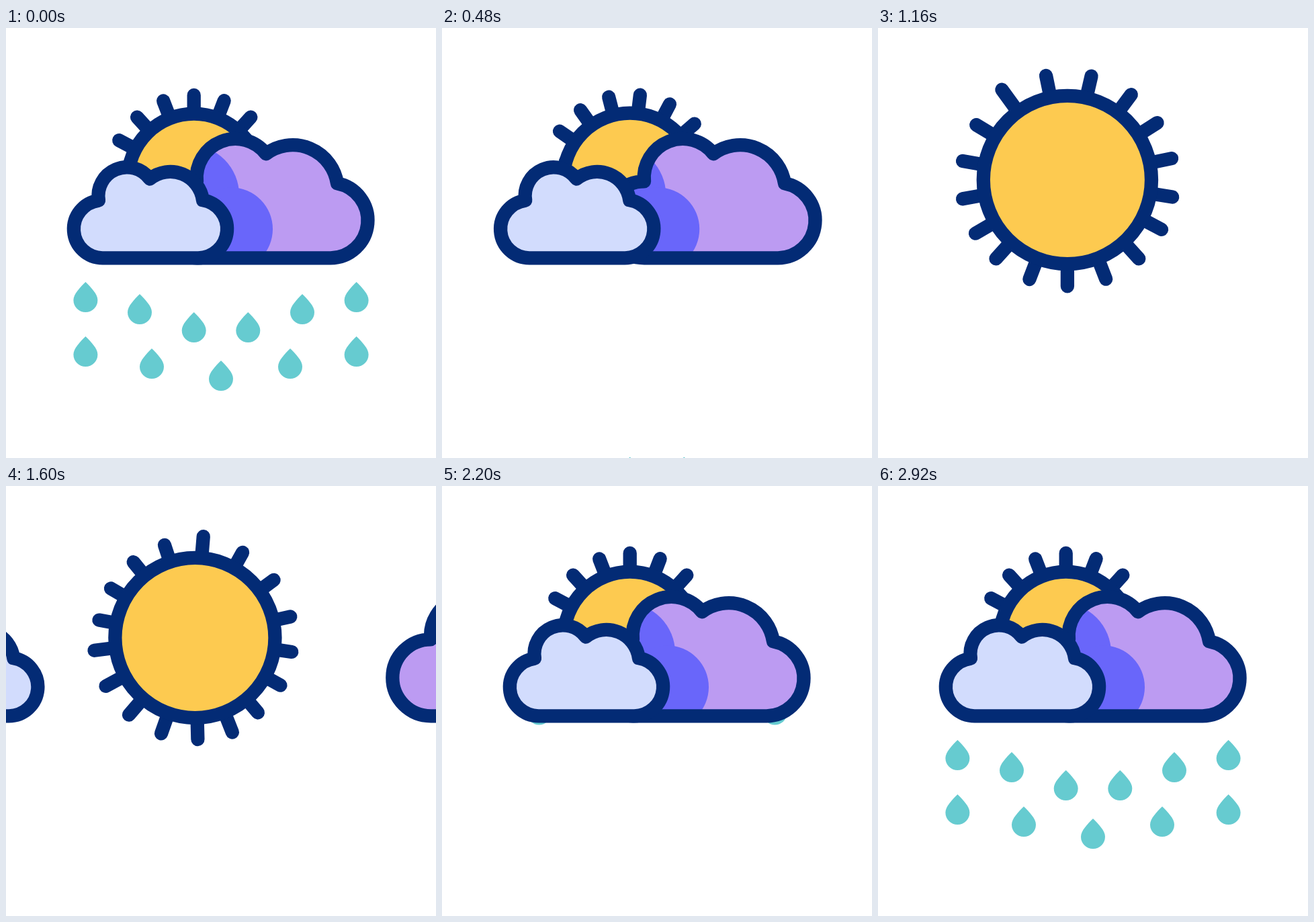
An HTML page with a canvas for the animation above (3000 ms loop, 640x640 px).

```html
<!DOCTYPE html>
<html lang="en">
<head>
<meta charset="utf-8">
<title>Changing weather</title>
<style>
  html, body { margin: 0; height: 100%; overflow: hidden; background: #fff; }
  canvas { display: block; width: 640px; height: 640px; }
</style>
</head>
<body>
<canvas id="stage" width="640" height="640"></canvas>
<script>
const ctx = document.getElementById('stage').getContext('2d');
const LOOP = 3000;
const NAVY = '#032b75';

const backCloud = new Path2D('M284 342A57 57 0 0 1 284 228A57.7 57.7 0 0 1 387 187A67 67 0 0 1 493 231A56 56 0 0 1 483 342Z');
const frontCloud = new Path2D('M144 342A43 43 0 0 1 138 256.4A42.4 42.4 0 0 1 214 224.3A48.9 48.9 0 0 1 293 256A43.3 43.3 0 0 1 286 342Z');
const dropShape = new Path2D('M0 0C8 8 18 18 18 27A18 18 0 0 1-18 27C-18 18-8 8 0 0Z');

// Rays that peek out over the clouds, and those that only grow in the clear sky.
const longRays = [-62.2, -42.2, -21.2, 0, 20.9, 42.2];
const shortRays = [59.8, 79.7, 100.2, 121.1, 144, 168.4, 193, 216.8, 237.6, 258.4, 279.3];

// Resting x, resting tip y, delay, height fallen on entry, sideways start offset
const drops = [
  [118.4, 459, 0, 159, 28],
  [217, 477, 40, 177, 0],
  [320, 495, 80, 195, 0],
  [118.4, 378, 150, 150, 29],
  [199, 396, 160, 181, 0],
  [279.7, 423, 200, 170, 0]
];

const clamp = v => Math.min(1, Math.max(0, v));
const smooth = v => (v = clamp(v), v * v * (3 - 2 * v));

// Cubic curve (.42, 0, .58, 1)
function ease(v) {
  v = clamp(v);
  let lo = 0, hi = 1;
  for (let i = 0; i < 24; i++) {
    const u = (lo + hi) / 2, w = 1 - u;
    if (1.26 * u * w * w + 1.74 * u * u * w + u * u * u < v) lo = u;
    else hi = u;
  }
  return smooth(lo);
}

function paintDrops(t) {
  const leaving = t < 1000;
  ctx.fillStyle = '#66cbd0';
  if (!leaving && t < 2100) return;
  for (const [x, y, delay, height, side] of drops) {
    let px = x, py = y;
    if (leaving) {
      py += (731 - y) * smooth((t - delay) / 440);
    } else {
      const left = 1 - smooth((t - 2131 - delay) / 440);
      px += side * left;
      py -= height * left;
    }
    for (const cx of x < 320 ? [px, 640 - px] : [px]) {
      ctx.save();
      ctx.translate(cx, py);
      ctx.fill(dropShape);
      ctx.restore();
    }
  }
}

function paintSun(open, turn, grow) {
  const r = 98.3 + 26.8 * open;
  const scale = 1 + 0.257 * open;
  const ray = (deg, reach) => {
    const a = (deg + turn) * Math.PI / 180;
    const s = Math.sin(a), c = -Math.cos(a);
    const tip = Math.max(r, reach * scale);
    ctx.moveTo(s * r, c * r);
    ctx.lineTo(s * tip, c * tip);
  };
  ctx.save();
  ctx.translate(279.7 + 2.2 * open, 226);
  ctx.beginPath();
  longRays.forEach(d => ray(d, 126));
  shortRays.forEach(d => ray(d, 98 + (d === 144 ? 34 : 28) * grow));
  ctx.stroke();
  ctx.beginPath();
  ctx.arc(0, 0, r, 0, 7);
  ctx.fillStyle = '#fdca50';
  ctx.fill();
  ctx.stroke();
  ctx.restore();
}

function paintClouds(open) {
  const backX = 450 * open, frontX = -364 * open;
  ctx.save();
  ctx.translate(backX, 0.3);
  ctx.fillStyle = '#bc9bf2';
  ctx.fill(backCloud);

  // The front cloud casts its shadow inside the back one.
  ctx.save();
  ctx.clip(backCloud);
  ctx.translate(frontX - backX, 0);
  ctx.fillStyle = '#6966fa';
  for (const [x, y, r] of [[273, 248, 74], [335, 299, 62]]) {
    ctx.beginPath();
    ctx.arc(x, y, r, 0, 7);
    ctx.fill();
  }
  ctx.fillRect(143, 245, 192, 116);
  ctx.restore();
  ctx.stroke(backCloud);
  ctx.restore();

  ctx.save();
  ctx.translate(frontX, 0.3);
  ctx.fillStyle = '#d2dcfd';
  ctx.fill(frontCloud);
  ctx.stroke(frontCloud);
  ctx.restore();
}

function paint(now) {
  const t = now % LOOP;
  const out = ease((t - 414) / 480);
  const back = ease((t - 1442) / 480);
  const grow = ease((t - 414) / 605) - ease((t - 1427) / 605);

  ctx.fillStyle = '#fff';
  ctx.fillRect(0, 0, 640, 640);
  ctx.strokeStyle = NAVY;
  ctx.lineWidth = 20.3;
  ctx.lineCap = ctx.lineJoin = 'round';

  paintDrops(t);
  paintSun(out - back, 180 * (out + back), grow);
  paintClouds(out - back);
}

let start;
function tick(now) {
  start ??= now;
  paint(now - start);
  requestAnimationFrame(tick);
}
paint(0);
requestAnimationFrame(tick);
</script>
</body>
</html>
```
